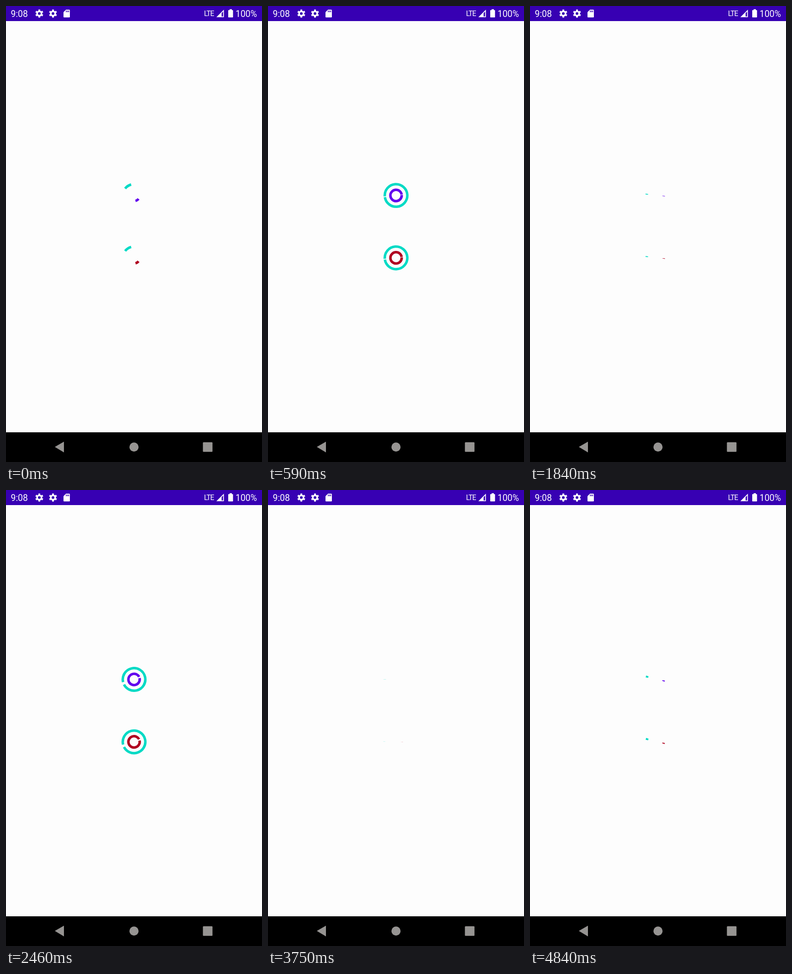
These frames come from a looping animation (561x998 px, 4.89 s). An HTML page:

```html
<!DOCTYPE html>
<html lang="en">
<head>
<meta charset="utf-8">
<title>Loading rings</title>
<style>
  html, body { margin: 0; width: 100%; height: 100%; overflow: hidden; background: #fdfdfd; }
  svg { display: block; width: 561px; height: 998px; }
  text { font-family: Roboto, sans-serif; font-size: 19.4px; }
  .ring { fill: none; stroke-width: 5.5; }
</style>
</head>
<body>
<svg viewBox="0 0 561 998">
  <defs>
    <g id="gear" fill="none" stroke="#fff">
      <circle r="4.8" stroke-width="3.6"/>
      <circle r="7.4" stroke-width="3" pathLength="12" stroke-dasharray="1 1" stroke-dashoffset="-.5"/>
    </g>
  </defs>

  <!-- status bar -->
  <rect width="561" height="33" fill="#3700b3"/>
  <g fill="#fff">
    <text x="10.5" y="24">9:08</text>
    <use href="#gear" x="73" y="16.5"/>
    <use href="#gear" x="103" y="16.5"/>
    <path d="M131.5 8h7q1.500 0 1.500 1.500v14q0 1.500-1.500 1.500h-11q-1.500 0-1.500-1.500v-10z"/>
    <path d="M132 10v3.500m2.700-3.500v3.500m2.700-3.500v3.500" stroke="#3700b3" stroke-width="1.500"/>
    <text x="434" y="22" style="font-size:15.8px;letter-spacing:-1.2px">LTE</text>
    <path fill-rule="evenodd" d="M461 24.500 477.500 8v16.500zM472.500 15.500v7.200h3.200v-10.400z"/>
    <path d="M490 7h5v2h1.500q1 0 1 1v14q0 1-1 1h-8.500q-1 0-1-1V10q0-1 1-1h2z"/>
    <text x="503" y="24">100%</text>
  </g>

  <!-- navigation bar -->
  <rect y="933" width="561" height="65" fill="#000"/>
  <g fill="#969492">
    <path d="M107 965 127 953.500v23.500z"/>
    <circle cx="280.500" cy="965.300" r="10"/>
    <rect x="431.500" y="954.800" width="21" height="21" rx="1.500"/>
  </g>

  <g id="loaders"></g>
</svg>
<script>
const PERIOD = 987, OFFSET = 230, CX = 280.6;
const loaders = document.getElementById('loaders');
const rings = [];

function addRing(cy, radius, color, startAngle) {
  const el = document.createElementNS('http://www.w3.org/2000/svg', 'circle');
  const attrs = { class: 'ring', cx: CX, cy, r: radius, stroke: color, pathLength: 360 };
  for (const key in attrs) el.setAttribute(key, attrs[key]);
  loaders.append(el);
  rings.push({ el, cy, startAngle });
}

for (const [cy, color] of [[414.6, '#6200ee'], [551.2, '#b00020']]) {
  addRing(cy, 24.7, '#03dac5', 180);
  addRing(cy, 12.4, color, 0);
}

// cubic-bezier(.57, 0, .06, 1), solved by bisection
function ease(x) {
  let lo = 0, hi = 1, u;
  for (let i = 0; i < 24; i++) {
    u = (lo + hi) / 2;
    const v = 1 - u;
    if (3 * v * v * u * .57 + 3 * v * u * u * .06 + u ** 3 < x) lo = u; else hi = u;
  }
  return u * u * (3 - 2 * u);
}

// The sweep and the start angle grow together
function draw(now) {
  const t = now % 4890;
  const sweep = 360 * ease((t + OFFSET) % PERIOD / PERIOD);
  for (const { el, cy, startAngle } of rings) {
    el.setAttribute('stroke-dasharray', `${sweep} 720`);
    el.setAttribute('transform', `rotate(${startAngle + sweep} ${CX} ${cy})`);
  }
}

let begin;
function tick(now) {
  begin ??= now;
  draw(now - begin);
  requestAnimationFrame(tick);
}
draw(0);
requestAnimationFrame(tick);
</script>
</body>
</html>
```
